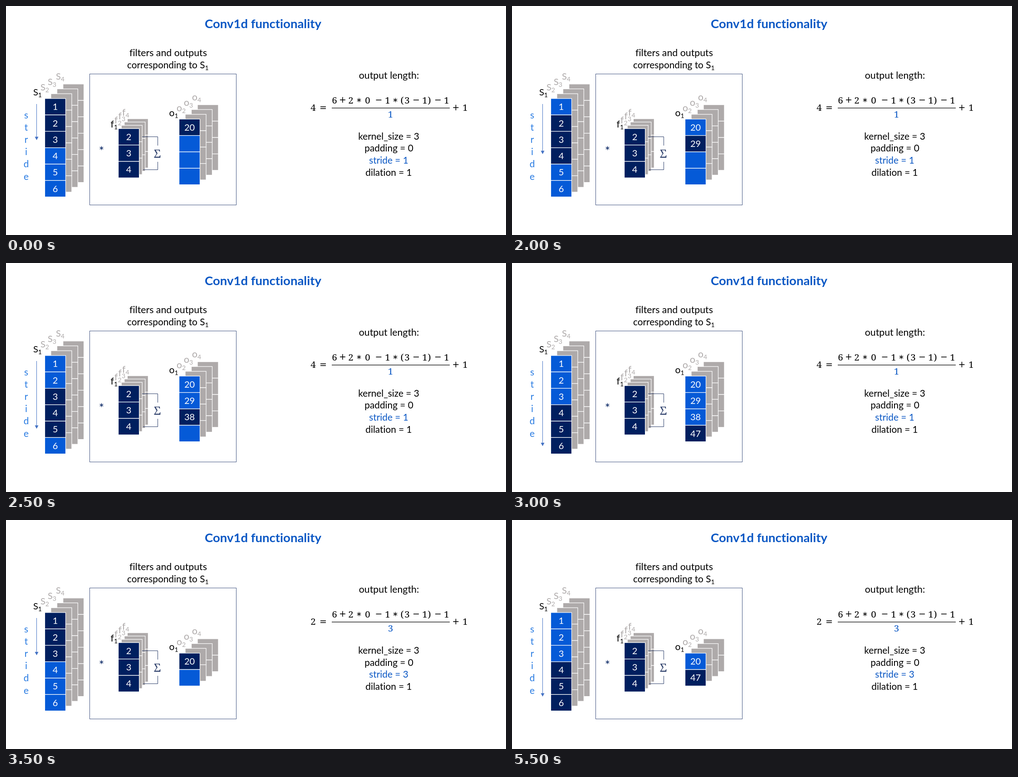
An HTML page that plays this animation: 1102 by 507 pixels, repeating every 6000 ms.

```html
<!DOCTYPE html>
<html lang="en">
<head>
<meta charset="utf-8">
<title>Conv1d functionality</title>
<style>
  html, body { margin: 0; width: 100%; height: 100%; overflow: hidden; background: #fff; }
  svg { display: block; width: 1102px; height: 507px; font: 20.8px Lato, sans-serif; font-variant-ligatures: none; }
  .math { font-family: "Noto Serif", serif; font-size: 20.5px; text-anchor: middle; }
  .op { font-family: "DejaVu Sans", sans-serif; font-size: 19px; }
  .star { font-family: "DejaVu Sans", sans-serif; font-size: 15px; }
  .cells rect { stroke: #fff; stroke-width: 1.2; }
  .cells text { fill: #fff; font-size: 20px; text-anchor: middle; }
  .mid { text-anchor: middle; }
</style>
</head>
<body>
<svg id="stage" viewBox="0 0 1102 507"></svg>
<script>
const NAVY = "#001f5f", BLUE = "#055ad7", ACCENT = "#0a57c4", GRAY = "#aeaaaa", INK = "#000";
const ROW = 36.3, COL = 46;
const stage = document.getElementById("stage");

function add(parent, tag, attrs, text) {
  const el = document.createElementNS("http://www.w3.org/2000/svg", tag);
  for (const key in attrs) el.setAttribute(key, attrs[key]);
  if (text !== undefined) el.textContent = text;
  parent.appendChild(el);
  return el;
}

function label(text, x, y, attrs, parent = stage) {
  return add(parent, "text", { x, y, fill: INK, ...attrs }, text);
}

function sub(el, n) {
  add(el, "tspan", { dy: 4, "font-size": 14 }, n);
}

// A column of cells with three gray copies behind it.
function stack(x, y, rows, dx, dy, parent = stage) {
  const g = add(parent, "g", { class: "cells" });
  const cells = [];
  for (let layer = 3; layer >= 0; layer--) {
    for (let r = 0; r < rows; r++) {
      const rect = add(g, "rect", {
        x: x + layer * dx, y: y + layer * dy + r * ROW,
        width: COL, height: ROW, fill: layer ? GRAY : NAVY
      });
      if (!layer) cells.push({ rect });
    }
  }
  cells.forEach((c, r) => {
    c.text = add(g, "text", { x: x + COL / 2, y: y + (r + 0.5) * ROW + 7.2 });
  });
  return cells;
}

function names(letter, size, spots, parent = stage) {
  spots.forEach(([x, y], i) => {
    sub(label(letter, x, y, { fill: i ? GRAY : INK, "font-size": size }, parent), i + 1);
  });
}

function formula(tokens, y) {
  return tokens.map(([s, x]) => {
    const cls = s === "∗" ? "star" : "+−=".includes(s) ? "op" : "";
    const g = add(stage, "g", { class: "math" });
    return label(s, x, y - (cls === "star" ? 2.5 : cls ? 1.3 : 0), { class: cls }, g);
  });
}

label("Conv1d functionality", 566.5, 48.5,
  { class: "mid", fill: ACCENT, "font-size": 27.5, "font-weight": 700 });
label("filters and outputs", 357.5, 111, { class: "mid", "font-size": 21.3 });
sub(label("corresponding to S", 267, 138), 1);
add(stage, "rect", {
  x: 184.5, y: 150.5, width: 323, height: 290, fill: "none", stroke: "#445683"
});

// Signal
const signal = stack(85.5, 204.9, 6, 13.4, -10.7);
names("S", 20, [[60, 197.5], [76, 186.5], [92, 175], [110, 163]]);
[..."stride"].forEach((ch, i) =>
  label(ch, 44.5, 249 + i * 27.1, { class: "mid", fill: "#2a7ce2" }));
const shaft = add(stage, "path", { stroke: "#4472c4" });
const head = add(stage, "path", { fill: "#4472c4" });

// Filter
label("*", 210.5, 330.5, { class: "mid", fill: NAVY, "font-size": 27 });
const filter = stack(247.6, 271.5, 3, 6.6, -7.3);
filter.forEach((c, i) => c.text.textContent = i + 2);
names("f", 21, [[230.5, 268.5], [239, 260], [247.5, 251], [256, 243]]);
add(stage, "path", {
  d: "M300 289.5H334.5V309M302 362.5H334.5V345", fill: "none", stroke: "#2f416c"
});
label("Σ", 333.5, 335.5, { class: "math", fill: "#2f416c", style: "font-size:26px" });

// Outputs for both stride settings
const outputs = [[250.4, 4, 0], [294.8, 2, 44.4]].map(([y, rows, shift]) => {
  const g = add(stage, "g", {});
  const cells = stack(381.5, y, rows, 13.5, -10.6, g);
  names("o", 21, [[359.5, 244], [376, 233], [392, 221], [410, 209]]
    .map(([lx, ly]) => [lx, ly + shift]), g);
  return { g, cells };
});

// Output length
const heading = label("output length:", 844, 160.5, { class: "mid", "font-size": 21.3 });
const [result] = formula([["4", 677], ["=", 699], ["+", 991.5], ["1", 1012]], 232.3);
formula([
  ["6", 724], ["+", 742], ["2", 760], ["∗", 778], ["0", 797], ["−", 821.5], ["1", 841],
  ["∗", 858], ["(", 873], ["3", 884], ["−", 904], ["1", 923], [")", 933], ["−", 952], ["1", 971]
], 215.5);
add(stage, "path", { d: "M718 225.8H978", stroke: INK, "stroke-width": 1.2 });
const divisor = label("1", 847.5, 247.3, { class: "math", fill: ACCENT });
label("kernel_size = 3", 843.5, 295.5, { class: "mid" });
const padding = label("padding = 0", 844, 322, { class: "mid" });
const strideText = label("", 843.5, 349, { class: "mid", fill: ACCENT });
label("dilation = 1", 843.5, 376, { class: "mid" });

const STEPS = [
  { until: 2000, stride: 1, pos: 0, tip: 297 },
  { until: 2500, stride: 1, pos: 1, tip: 328 },
  { until: 3000, stride: 1, pos: 2, tip: 367 },
  { until: 3500, stride: 1, pos: 3, tip: 405.5 },
  { until: 5500, stride: 3, pos: 0, tip: 299.5 },
  { until: 6000, stride: 3, pos: 1, tip: 391 }
];

// Sum of the inputs under the kernel, weighted 2, 3, 4.
const convolve = start => [0, 1, 2].reduce((sum, k) => sum + (start + k + 1) * (k + 2), 0);

function draw(t) {
  const { stride, pos, tip } = STEPS.find(s => t < s.until);
  const start = pos * stride;
  const wide = stride === 3;

  signal.forEach((c, i) => {
    c.text.textContent = i + 1;
    c.rect.setAttribute("fill", i >= start && i < start + 3 ? NAVY : BLUE);
  });
  outputs.forEach((out, n) => {
    out.g.setAttribute("visibility", wide === (n === 1) ? "visible" : "hidden");
    out.cells.forEach((c, i) => {
      c.text.textContent = i <= pos ? convolve(i * stride) : "";
      c.rect.setAttribute("fill", i === pos ? NAVY : BLUE);
    });
  });
  shaft.setAttribute("d", `M67.5 217V${tip - 6}`);
  head.setAttribute("d", `M63.5 ${tip - 7.5}h8l-4 7.5z`);

  result.textContent = wide ? 2 : 4;
  divisor.textContent = stride;
  strideText.textContent = "stride = " + stride;
  heading.setAttribute("y", wide ? 161.3 : 160.5);
  padding.setAttribute("y", wide ? 322.7 : 322);
}

const t0 = performance.now();
function tick() {
  draw((performance.now() - t0) % 6000);
  requestAnimationFrame(tick);
}
tick();
</script>
</body>
</html>
```
